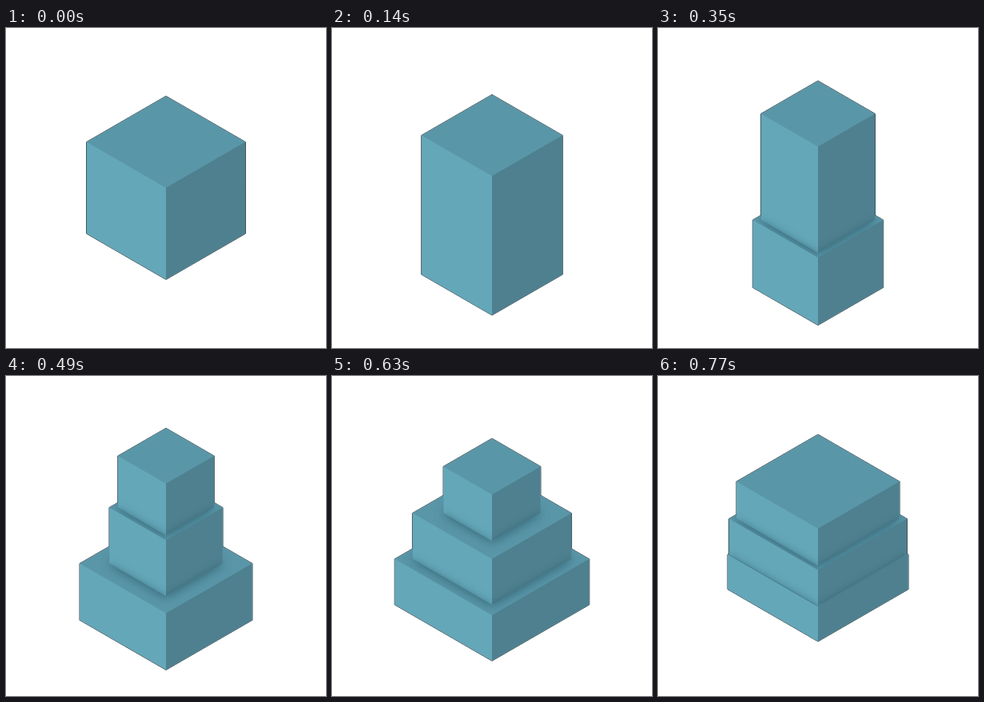
An HTML page with a canvas for the animation above (840 ms loop, 400 px wide and 400 px high).

```html
<!DOCTYPE html>
<html lang="en">
<head>
<meta charset="utf-8">
<title>Stacking cube</title>
<style>
  html, body { margin: 0; width: 100%; height: 100%; overflow: hidden; background: #fff; }
  canvas { display: block; width: 400px; height: 400px; }
</style>
</head>
<body>
<canvas id="stage" width="400" height="400"></canvas>
<script>
const ctx = document.getElementById('stage').getContext('2d');
const STEP = 70, STEPS = 12, CX = 200, SLOPE = 1 / Math.sqrt(3);
const CUBE = { w: 99.5, top: 142.5, bottom: 257 };
const COLOR = { top: '#5996a8', left: '#64a7b9', right: '#4e808f', edge: '#3c4c52' };

const mix = (a, b, t) => a + (b - a) * t;
const ease = t => (1 - Math.cos(Math.PI * Math.min(1, Math.max(0, t)))) / 2;

// All tiers narrow together; each one breaks away, swells to a peak and returns.
const shrink = i => CUBE.w - 5.6 * i;
function width(i, leave, peak, widest) {
  if (i <= leave) return shrink(i);
  if (i <= peak) return mix(shrink(leave), widest, ease((i - leave) / (peak - leave)));
  return mix(widest, CUBE.w, ((i - peak) / (STEPS - peak)) ** 2.5);
}

// Heights of the centres of the horizontal faces.
const crown = i => i < 6.9
  ? mix(CUBE.top, 99.7, ease(i / 6.9))
  : mix(99.7, CUBE.top, ((i - 6.9) / (STEPS - 6.9)) ** 1.3);
const ground = i => i < 4
  ? mix(CUBE.bottom, 334, ease(i / 3.3))
  : mix(334, CUBE.bottom, (i - 4) / (STEPS - 4));
const lowSeam = i => 240 - 2.8 * (i - 5);
const highSeam = i => 164.5 + 3.5 * (i - 7);

// Tiers from the ground up; equal neighbours form a single block.
function tiersAt(i) {
  const all = [
    { w: width(i, 4, 8.8, 121.8), top: lowSeam(i), bottom: ground(i) },
    { w: width(i, 6, 10.6, 112), top: highSeam(i), bottom: lowSeam(i) },
    { w: width(i, 8.2, 11.4, 104), top: crown(i), bottom: highSeam(i) }
  ];
  return all.reduce((tiers, tier) => {
    const below = tiers[tiers.length - 1];
    if (below && below.w === tier.w) below.top = tier.top;
    else tiers.push(tier);
    return tiers;
  }, []);
}

function trace(points) {
  ctx.beginPath();
  points.forEach(([x, y]) => ctx.lineTo(x, y));
  ctx.closePath();
}

function fill(points, color) {
  trace(points);
  ctx.fillStyle = color;
  ctx.fill();
}

function rhombus(w, y) {
  const h = w * SLOPE;
  return [[CX - w, y], [CX, y - h], [CX + w, y], [CX, y + h]];
}

function outline({ w, top, bottom }) {
  const h = w * SLOPE;
  return [[CX - w, top], [CX, top - h], [CX + w, top],
          [CX + w, bottom], [CX, bottom + h], [CX - w, bottom]];
}

function side({ w, top, bottom }, dir) {
  const h = w * SLOPE, x = CX + dir * w;
  return [[x, top], [CX, top + h], [CX, bottom + h], [x, bottom]];
}

// Soft shade of one shape, seen only inside another.
function shade(area, caster, color, blur) {
  ctx.save();
  trace(area);
  ctx.clip();
  ctx.shadowColor = color;
  ctx.shadowBlur = blur;
  fill(caster, COLOR.right);
  ctx.restore();
}

function draw(i) {
  const tiers = tiersAt(i);
  ctx.fillStyle = '#fff';
  ctx.fillRect(0, 0, 400, 400);

  ctx.strokeStyle = COLOR.edge;
  ctx.lineWidth = 1;
  tiers.forEach(tier => { trace(outline(tier)); ctx.stroke(); });

  tiers.forEach((tier, n) => {
    const below = tiers[n - 1], above = tiers[n + 1];
    const body = { w: tier.w - 0.4, top: tier.top, bottom: tier.bottom - 0.2 };
    fill(outline(body), COLOR.top);
    for (const [dir, color] of [[-1, COLOR.left], [1, COLOR.right]]) {
      const face = side(body, dir);
      fill(face, color);
      if (below) {
        const ledge = side({ w: tier.w, top: tier.bottom, bottom: tier.bottom + 20 }, dir);
        shade(face, ledge, 'rgba(35,80,95,.5)', 9);
      }
    }
    if (above) shade(rhombus(body.w, body.top), rhombus(above.w, body.top), 'rgba(35,80,95,.75)', 14);
  });
}

const start = performance.now();
function tick() {
  draw(Math.floor((performance.now() - start) / STEP) % STEPS);
  requestAnimationFrame(tick);
}
tick();
</script>
</body>
</html>
```
